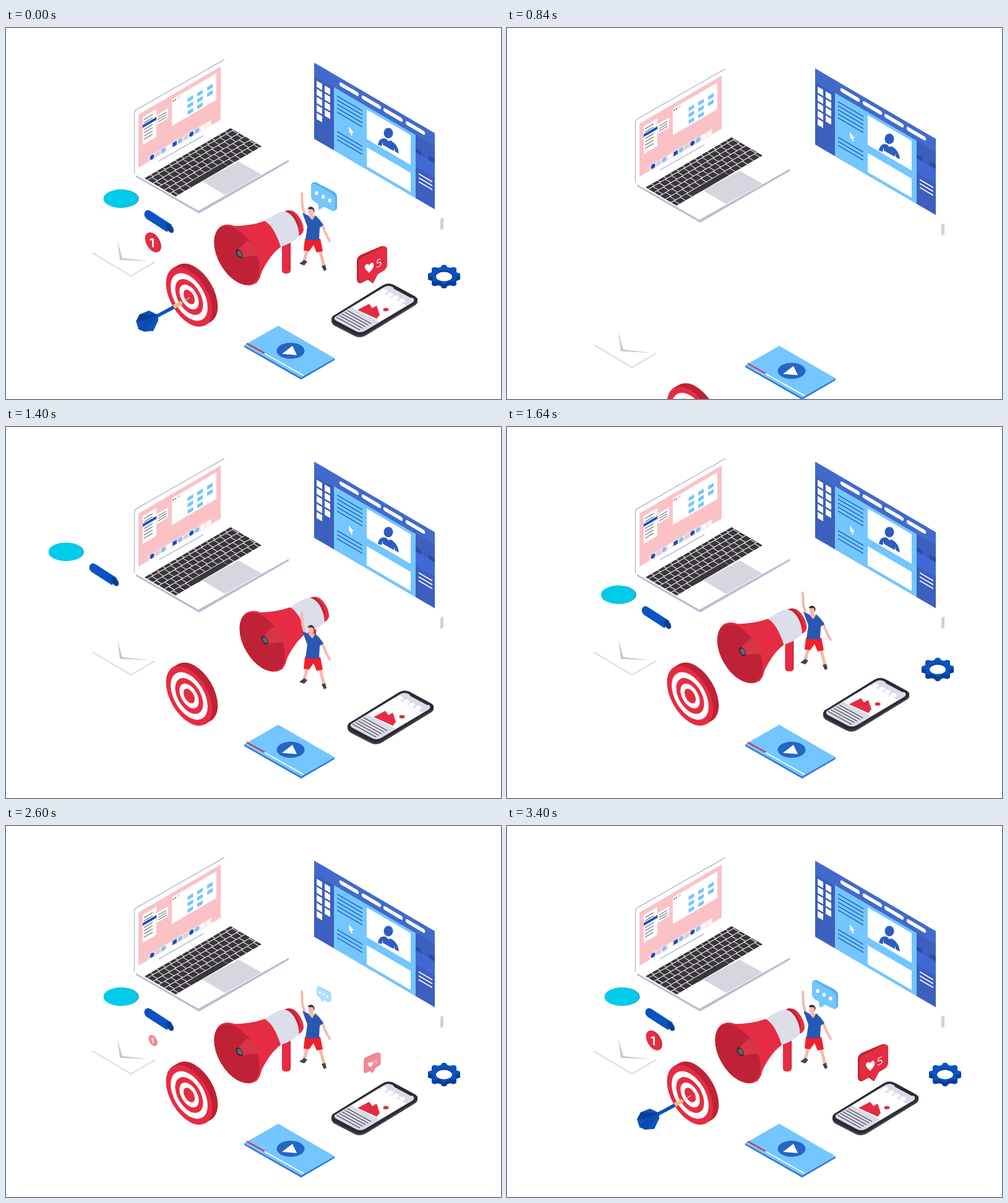
Write an HTML page that moves like this. It is 800 px wide and 600 px high and loops after 3.76 s.

```html
<!DOCTYPE html>
<html lang="en">
<head>
<meta charset="utf-8">
<title>Isometric marketing scene</title>
<style>
  html, body { margin: 0; width: 100%; height: 100%; overflow: hidden; background: #fff; }
  svg { display: block; width: 100vw; height: 100vh; }
  text { font-family: "Open Sans", sans-serif; fill: #fff; text-anchor: middle; }
</style>
</head>
<body>
<svg id="stage" viewBox="0 0 800 600"></svg>
<script>
const RED = '#e62c42', DARK_RED = '#bf2236', BLUE = '#0b52c2', NAVY = '#0a3f94', SKY = '#73c6ff', GREY = '#b9bdd0';

const poly = (points, fill) => `<polygon points="${points}" fill="${fill}"/>`;
const rect = (x, y, w, h, fill, r = 0) => `<rect x="${x}" y="${y}" width="${w}" height="${h}" rx="${r}" fill="${fill}"/>`;
const oval = (x, y, rx, ry, fill) => `<ellipse cx="${x}" cy="${y}" rx="${rx}" ry="${ry}" fill="${fill}"/>`;
const path = (d, fill) => `<path d="${d}" fill="${fill}"/>`;
const stroke = (d, color, width, cap = 'butt') =>
  `<path d="${d}" fill="none" stroke="${color}" stroke-width="${width}" stroke-linecap="${cap}" stroke-linejoin="round"/>`;
const matrix = (m, body) => `<g transform="matrix(${m})">${body}</g>`;
const each = (n, draw) => Array.from({ length: n }, (_, i) => draw(i)).join('');
// Circle on the wall plane that runs down to the right.
const disc = (x, y, r, fill) => matrix([.866, .5, 0, 1, x, y], oval(0, 0, r, r, fill));

function laptop() {
  const dockColors = [BLUE, '#cfd2e0', SKY, '#fff', BLUE, SKY, '#cfd2e0', BLUE, SKY, '#fff', '#fff'];
  const screen = rect(0, 0, 133, 86, '#fbc2c6') +
    rect(7, 8, 22, 45, '#fff') + rect(30, 18, 18, 16, '#fff') +
    each(7, i => rect(9, 13 + i * 5.3, 14, 1, '#444')) +
    each(3, i => rect(32, 22 + i * 4, 13, 1, '#555')) +
    rect(7, 21, 22, 4.5, BLUE) +
    rect(54, 7, 72, 43, '#fff') +
    oval(56.5, 11, 1.2, 1.2, RED) + oval(60, 11, 1, 1, '#333') + rect(63, 10, 4, 1, '#999') +
    each(8, i => rect([79.5, 95, 111][i % 3], [20.5, 30.5, 41][i / 3 | 0], 9, 6, SKY)) +
    rect(16, 77, 102, 9, '#fddde0') +
    dockColors.map((color, i) => [3, 4, 6, 9, 10].includes(i)
      ? rect(19 + i * 9.1, 78.5, 6.5, 6.5, color) : oval(22 + i * 9.1, 81.7, 3.5, 3.6, color)).join('');
  const rowTops = [0, 10, 28, 46, 64, 82];
  const keys = rowTops.map((top, row) => each(15, i => {
    const start = i * 7.2 - row * 1.7 % 5, left = Math.max(0, start), right = Math.min(100, start + 6.5);
    return right > left ? rect(left, top, right - left, row ? 16 : 8, '#3a363b') : '';
  })).join('') + rect(24, 82, 37, 16, '#3a363b');
  return path('M207 236V138Q207 134 210 132L352 51V157L210 239Z', '#fff') +
    stroke('M207.5 236V138Q207.5 134 211 132L353 51', GREY, 1.5) +
    matrix([1, -.585, 0, 1, 214, 140], screen) +
    poly('210,238 352,157 457,213 311,296', '#fff') +
    poly('210,238 311,295.5 457,213 457,216.5 312,300 210,241', GREY) +
    stroke('M247 215L319 174', GREY, 1.5) +
    matrix([1.39, -.81, .51, .3, 224, 243], keys) +
    poly('317,248 376,216 413,237 354,270', '#d6d6df');
}

function monitor() {
  const site = rect(0, 0, 195, 123, '#426acd') +
    rect(0, 22, 32, 101, '#3d5fbd') + rect(32, 21, 132, 102, SKY) +
    rect(164, 21, 31, 102, '#3d5fbd') + rect(164, 49, 31, 23, '#4169d5') +
    rect(164, 42, 9, 7, '#2850a8') + rect(185, 42, 10, 7, '#2850a8') +
    [44, 80, 115, 151].map(u => stroke(`M${u} 10h25`, '#fff', 6.5, 'round')).join('') +
    each(9, i => rect(i % 2 ? 17 : 4, 27 + (i >> 1) * 13, 9, 10, '#fff')) +
    each(5, i => rect(37, 31.5 + i * 6.5, 41, 1.5, '#1c56b4')) +
    each(3, i => rect(37, 89 + i * 6.5, 41, 1.5, '#1c56b4')) +
    rect(85, 26, 71, 48, '#fff') + rect(85, 87, 71, 31, '#fff') +
    each(3, i => rect(169, 80 + i * 6.3, 22, 2, '#fff'));
  return matrix([1, .585, 0, 1, 498, 56], site) +
    path('M554 159L562 169L559 169L560 174L558 174L557 169L555 170Z', '#fff') +
    oval(618, 170, 7.5, 8.5, '#2d5cc0') +
    path('M601 189Q603 176 614 179L618 183L622 182Q634 189 635 203L629 200L627 194V199L609 189V184L607 191Z', '#2d5cc0') +
    poly('702,309 707,306 707,324 702,327', '#cdd0de');
}

const envelope = () => stroke('M140 364L202 401L241 378', '#d6d6de', 1.8) +
  path('M180 344L184 375L232 377L188 372Z', '#c8c8d1');

const video = () => poly('385,513 477,565 531,534 531,537 477,568.5 385,516', '#2f78d2') +
  poly('385,513 440,481.5 531,534 477,565', SKY) +
  oval(460, 522, 22.5, 13, '#2465c5') + poly('446,527 463,514 470,529', '#fff') +
  stroke('M417 526L481 562', '#fff', 2) + stroke('M389 510L418 526', '#dc2f3c', 2);

const target = () => each(10, i => disc(305 - i, 429 + i * .6, 43, DARK_RED)) +
  [43, 34.5, 26, 18, 10.5].map((r, i) => disc(296, 435, r, i % 2 ? '#fff' : RED)).join('');

const dart = () => stroke('M282 446L297 436', '#c9ccd8', 1.5) +
  stroke('M240 468L272 451', BLUE, 5.5) + stroke('M271 451L284 444', '#f5b893', 7) +
  path('M246 464L231 457L216 463L210 474L214 487L223 491L238 490L246 473Z', BLUE) +
  path('M246 464L222 474L211 474L216 463Z', NAVY) + path('M244 466L226 491L214 487L224 474Z', '#0b4aaf');

const megaphone = () => rect(446, 340, 14, 57, RED, 5) + stroke('M459 345V392', DARK_RED, 1.2) +
  path('M452 296Q462 292 471 302Q481 314 481 327Q479 335 470 337Z', RED) +
  path('M452 296Q466 294 474 318Q476 330 470 337L464 339L448 299Z', DARK_RED) +
  path('M417 313Q428 304 445 297Q457 295 466 309Q475 325 473 337Q461 349 444 354Z', '#dcdfe9') +
  path('M353 320Q391 322 418 312Q433 320 444 354Q422 370 405 413L374 400Z', RED) +
  disc(375, 367, 44, RED) + disc(373, 368, 42.5, DARK_RED) +
  path('M375 359L389 344Q407 350 412 367L381 371Z', '#d93549') +
  disc(377, 365, 6.5, '#2d2b32') + disc(377.5, 365, 4.5, '#66636c');

const person = () => stroke('M478 268L479 288L483 302', '#f5b9ae', 4, 'round') +
  stroke('M510 316L517 333L523 344', '#f5b9ae', 4, 'round') +
  stroke('M487 358L482 377', '#f5b9ae', 5) + stroke('M507 358L514 385', '#f5b9ae', 5) +
  path('M474 381L482 375L487 378L482 384Z', '#464249') + path('M510 385L516 383L518 391L514 393Z', '#464249') +
  path('M483 341H508L512 361L502 363L497 351L490 361L481 360Z', '#f2202b') +
  path('M479 299L488 303L500 303L507 310L513 319L507 323L506 342Q496 345 484 342L487 321Z', '#2858b2') +
  path('M488 303L495 311L500 303Z', '#f5b9ae') +
  oval(493, 297, 4.5, 7, '#f5b9ae') + path('M488 293Q488 289 494 289Q500 291 498 299L496 293Z', '#393339');

const magnifier = () => oval(187, 276, 27.5, 14.5, '#1b5aa8') + oval(185.5, 276, 28, 15, '#00cbe8') +
  stroke('M230 302L264 324', BLUE, 14) + oval(229.5, 301.5, 6, 7, BLUE) +
  matrix([.87, .5, 0, 1, 265, 324], oval(0, 0, 7, 6.5, NAVY));

function phone() {
  const outline = 'M528 466L609 416Q617 411 626 415L661 434Q669 439 662 445L582 494Q573 500 563 495L530 478Q523 472 528 466Z';
  return `<g transform="translate(0 3)">${path(outline, '#46424b')}</g>` + path(outline, '#2d2a32') +
    path('M532 467L611 419Q618 415 625 419L657 436Q662 440 657 444L580 490Q572 494 565 490L533 473Q529 470 532 467Z', '#d9dce8') +
    poly('558,452 602,425 647,449 603,475', '#fff') +
    stroke('M629 420L655 434', '#2d2a32', 5, 'round') +
    [[611, 425.5], [621, 431], [630, 436], [640, 441]].map(([x, y]) => oval(x, y, 5, 3.6, '#fff')).join('') +
    poly('568,456 587,446 592,453 599,449 604,464 599,470', RED) + oval(614, 455.5, 4.5, 2.8, RED) +
    each(5, i => stroke(`M${552 - i * 4.5} ${457 + i * 2.6}l38 21`, '#3f3c47', 1.1));
}

function gear() {
  const points = each(32, i => {
    const angle = (i - .5) * Math.PI / 16, r = i % 4 < 2 ? 1 : .78;
    return `${(26 * r * Math.cos(angle)).toFixed(1)},${(15.5 * r * Math.sin(angle)).toFixed(1)} `;
  });
  const layer = (y, fill) => `<g transform="translate(708 ${y})">${poly(points, fill)}</g>`;
  return each(7, i => layer(405.5 - i, NAVY)) + layer(398.5, BLUE) +
    oval(708, 400.5, 13.5, 8.5, NAVY) + oval(708, 402, 13, 7.5, '#fff');
}

const chat = () => path('M495 250L500 249L529 264Q535 268 535 273V292L531 296L514 289L506 294L504 284Q494 279 493 273V253Z', '#5aafe8') +
  path('M493 255Q493 249 499 252L525 267Q532 271 532 276V292Q532 298 526 295L514 289L506 294L504 284L498 280Q493 277 493 272Z', SKY) +
  [[502, 267], [512.5, 273], [523, 279]].map(([x, y]) => oval(x, y, 2.7, 3.3, '#fff')).join('');

const like = () => path('M567 377Q567 371 573 367L606 353Q613 352 616 357V382Q616 388 611 392L601 398L593 413L585 407L573 413Q567 413 567 406Z', DARK_RED) +
  path('M570 379Q570 374 575 371L609 354Q616 352 616 359V382Q616 388 611 391L601 397L593 413L587 405L576 411Q570 413 570 406Z', RED) +
  path('M587 396L581 390Q578 384 583 382Q586 381 587 384Q590 378 593 380Q596 384 592 390Z', '#fff') +
  matrix([1, -.45, 0, 1, 602.5, 386], '<text font-size="17">5</text>');

const badge = () => disc(238.5, 346.5, 14.2, DARK_RED) + disc(237, 347, 14.2, RED) +
  matrix([.95, .4, 0, 1, 236.5, 354], '<text font-size="20" font-weight="700">1</text>');

// Slides: start offset x and y, start time, duration, overshoot.
const slides = [
  [laptop, 0, -310, 470, 710, 1.32],
  [monitor, 0, -300, 470, 770, 1.32],
  [envelope, 0, 270, 735, 578, 0],
  [video, 0, 125, 521, 882, 0],
  [target, 0, 240, 817, 525, 1.7],
  [megaphone, -490, 243, 1134, 543, 1.7],
  [person, 0, -400, 1061, 480, 1.7],
  [magnifier, -300, -250, 1200, 600, 0],
  [phone, 280, 140, 1250, 500, 1.7],
  [gear, 150, 125, 1420, 460, 1.7],
  [dart, -300, 130, 2790, 480, 0]
];
// Pops: centre of growth.
const pops = [[chat, 514, 272], [like, 592, 383], [badge, 237.5, 347]];

const LOOP = 3760, STEP = 40, CLEAR = 80, POP_START = 2400, POP_TIME = 360;
const stage = document.getElementById('stage');
stage.innerHTML = [...slides, ...pops].map(([draw]) => `<g>${draw()}</g>`).join('');
const nodes = [...stage.children];

function render(time) {
  const t = time < CLEAR ? LOOP : time;
  slides.forEach(([, dx, dy, start, duration, over], i) => {
    const left = Math.max(0, 1 - (t - start) / duration);
    const rest = (1 + over) * left ** 3 - over * left ** 2;
    nodes[i].setAttribute('visibility', left < 1 ? 'visible' : 'hidden');
    nodes[i].setAttribute('transform', `translate(${dx * rest} ${dy * rest})`);
  });
  const grow = Math.min(1, Math.max(0, (t - POP_START) / POP_TIME));
  pops.forEach(([, x, y], i) => {
    const node = nodes[slides.length + i];
    node.setAttribute('opacity', grow);
    node.setAttribute('transform', `translate(${x} ${y}) scale(${grow}) translate(${-x} ${-y})`);
  });
}

const begin = performance.now();
function tick() {
  const elapsed = (performance.now() - begin) % LOOP;
  render(Math.floor(elapsed / STEP) * STEP);
  requestAnimationFrame(tick);
}
tick();
</script>
</body>
</html>
```
